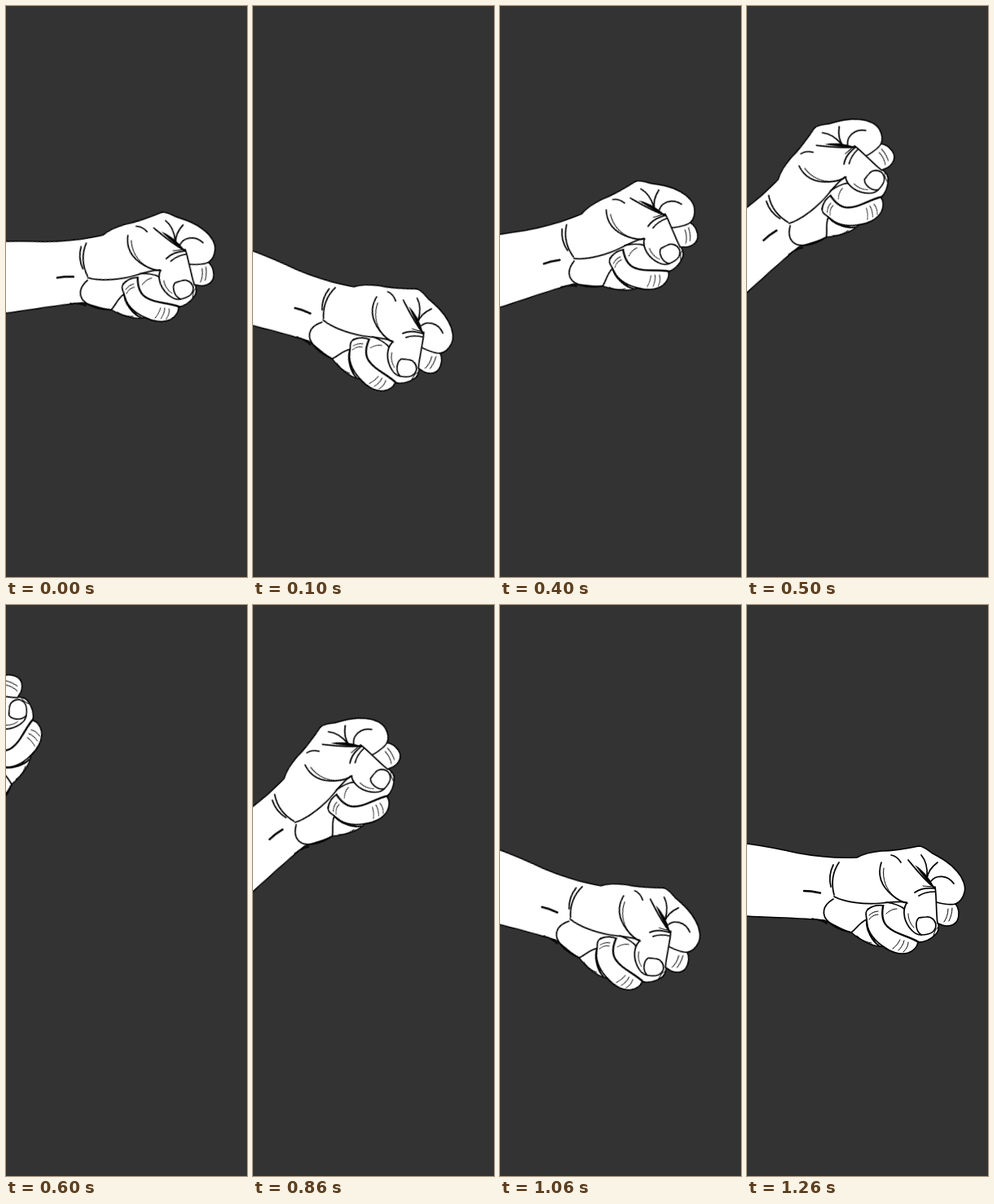
These frames come from a looping animation (296 px wide and 701 px high, 6.26 s). An HTML page:

```html
<!DOCTYPE html>
<html lang="en">
<head>
<meta charset="utf-8">
<title>Swinging fist</title>
<style>
  html, body { margin: 0; width: 100%; height: 100%; overflow: hidden; background: #333; }
  svg { display: block; width: 296px; height: 701px; }
  .ink { fill: none; stroke: #000; stroke-linecap: round; stroke-linejoin: round; }
  .skin { fill: #fff; stroke: #000; stroke-width: 1.6; stroke-linejoin: round; }
  .line { stroke-width: 1.7; }
  .fine { stroke-width: 1; }
  .bold { stroke-width: 2.3; }

  /* Each pose is held until the next; the pivot is the thumbnail. */
  #arm {
    transform-origin: 220px 393px;
    animation: swing 6260ms step-end infinite;
  }
  @keyframes swing {
    0%       { transform: translate(-2px, -46px) rotate(-10.7deg); }
    1.597%   { transform: translate(-31px, 51px) rotate(12.4deg); }
    3.194%   { transform: translate(-76px, 115px) rotate(29deg); }
    4.792%   { transform: translate(-31px, 51px) rotate(12.4deg); }
    6.389%   { transform: translate(-11px, -90px) rotate(-20.6deg); }
    7.987%   { transform: translate(-63px, -180px) rotate(-44.3deg); }
    9.584%   { transform: translate(-206px, -265px) rotate(-80deg); }
    13.738%  { transform: translate(-63px, -180px) rotate(-44.3deg); }
    15.335%  { transform: translate(-11px, -90px) rotate(-20.6deg); }
    16.932%  { transform: translate(-31px, 51px) rotate(12.4deg); }
    18.530%  { transform: translate(-13px, 26px) rotate(6deg); }
    20.127%, 100% { transform: none; }
  }
</style>
</head>
<body>
<svg viewBox="0 0 296 701">
  <rect width="296" height="701" fill="#333"/>
  <g id="arm">
    <path class="skin" d="M-60 284 L0 293 C22 296 42 300 62 304.500 C86 309 112 311 135 310
      C144 305 154 303 165 302 C182 302 197 299 211 296 C217 296 222 301 228 305
      C239 311 250 317 258 327 C266 336 269 346 267 353 C265 361 261 365 256 367
      C261 373 261 382 258 388 C254 394 246 395 240 393 L235 391
      C236 398 235 402 231 405 C225 411 218 414 210 414 C209 420 204 425 198 427
      C188 430 176 426 167 419 C157 420 142 414 128 402
      C116 399 107 392 95 387 C65 384 30 384 0 382 L-60 378 Z"/>

    <g class="ink line">
      <!-- wrist and palm -->
      <path d="M113 316 C105 328 103 341 107 356"/>
      <path d="M106 319 C101 329 101 338 103 346"/>
      <path d="M107 358 C120 365 145 368 165 366 C177 365 186 363 196 365"/>
      <path d="M106 361 C96 367 92 375 96 384 C102 393 113 399 128 402"/>
      <path d="M80 385 C86 386 92 387 98 391"/>
      <path d="M128 402 C135 397 138 390 147 386"/>
      <path d="M165 316 C160 331 165 345 178 356 C185 362 190 365 197 366"/>
      <path d="M177 307 C183 308 186 311 189 316"/>
      <!-- thumb -->
      <path d="M231 346 C233 359 232 375 234 391"/>
      <path d="M196 366 C190 376 193 390 203 400 C206 403 210 405 214 405"/>
      <path d="M211 384 C206 389 207 400 214 405 C223 405 231 402 232 394 C232 387 226 382 220 383 C216 383 213 384 211 384 Z"/>
      <path d="M206 353 C213 348 221 347 231 348"/>
      <path d="M211 357 C217 353 224 352 231 352"/>
      <path d="M198 313 C207 324 217 337 231 348"/>
      <!-- index finger -->
      <path d="M221 336 C222 328 226 322 234 316"/>
      <path d="M214 307 C220 314 222 322 221 334"/>
      <path d="M226 339 C232 331 246 331 254 342"/>
      <path d="M256 367 C249 369 241 367 233 365"/>
      <!-- lower fingers -->
      <path d="M171 365 C178 366 187 368 193 373"/>
      <path d="M148 374 C154 369 161 368 168 369"/>
      <path d="M147 386 C146 379 145 377 149 373"/>
      <path d="M147 386 C147 399 154 410 167 419"/>
      <path d="M151 405 C154 411 157 415 162 418"/>
    </g>

    <g class="ink bold">
      <path d="M70 351 L79 351.500 L90 353.500"/>
      <path d="M167 370 C165 382 167 391 174 396 C182 404 198 406 211 414"/>
      <path d="M147 388 C147 396 149 402 153 407"/>
    </g>
    <path d="M206 319 Q219 326 231 348 Q221 340 206 319Z M151 406 L156 410 L161 418Z"/>

    <g class="ink fine">
      <path d="M168 323 C166 337 171 349 180 357"/>
      <path d="M216 345 L230 346"/>
      <path d="M247 373 C247 379 245 385 242 389 M252 372 C252 378 250 384 248 388"/>
      <path d="M150 386 C153 382 157 380 161 380 M150 381 C153 378 157 376 161 376"/>
      <path d="M188 411 C186 415 183 419 179 422 M193 412 C192 417 189 421 186 424 M198 414 C198 419 195 423 192 426"/>
      <path d="M171 379 C175 375 180 373 184 373"/>
      <path d="M135 406 C141 412 147 414 153 415"/>
      <path d="M198 379 C198 386 201 392 205 396"/>
      <path d="M229 406 C230 401 232 398 234 396"/>
    </g>
  </g>
</svg>
</body>
</html>
```
